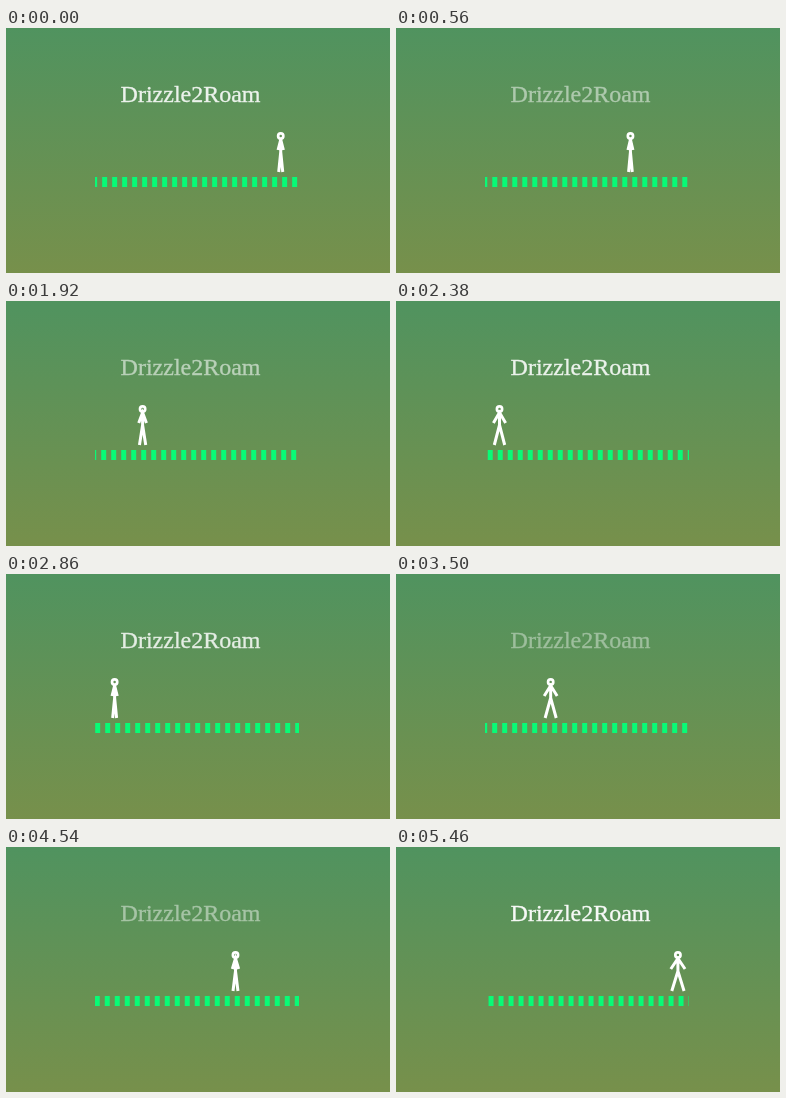
Write an HTML page that moves like this. It is 384 by 245 pixels and loops after 5560 ms.

```html
<!DOCTYPE html>
<html lang="en">
<head>
<meta charset="utf-8">
<title>Drizzle2Roam</title>
<style>
  html, body { margin: 0; width: 100%; height: 100%; overflow: hidden; }
  body { background: linear-gradient(#50935f, #77904b); }
  svg { display: block; width: 384px; height: 245px; }
  text { font: 24px "Liberation Serif", "Times New Roman", serif; fill: #fff; stroke: #fff; stroke-width: 0.35; }
  #walker { fill: none; stroke: #fff; stroke-width: 3; }
  #road { stroke: #08fb76; stroke-width: 10; stroke-dasharray: 5; }
</style>
</head>
<body>
<svg viewBox="0 0 384 245">
  <text id="title" x="114.6" y="74">Drizzle2Roam</text>
  <line id="road" x1="89" y1="154" x2="293" y2="154"/>
  <g id="walker">
    <circle cy="108" r="2.6" stroke-width="2.7"/>
    <path id="limbs"/>
  </g>
</svg>
<script>
  const LOOP = 5560;
  const STEPS = 200;
  const LEFT = 89;
  const SPAN = 200;
  const LEFT_TURN = 93;
  const STRIDE = 10;
  const [title, road, walker, limbs] =
    ["title", "road", "walker", "limbs"].map(id => document.getElementById(id));

  const mod = (a, b) => ((a % b) + b) % b;

  // Triangle wave: 0 at phase 0, 1 at half a period.
  const triangle = (n, period) => 1 - Math.abs(1 - 2 * mod(n, period) / period);

  function draw(time) {
    const n = mod(time, LOOP) / LOOP * STEPS;
    const x = LEFT + SPAN * triangle(n - LEFT_TURN, STEPS) - 0.2;
    const swing = triangle(n - 1.5, STRIDE);
    const leg = 0.3 + 5.9 * swing;
    const arm = 0.8 + 6.4 * swing;

    walker.setAttribute("transform", `translate(${x} 0)`);
    limbs.setAttribute("d",
      `M0 110.5V125M${-arm} 122L0 111.5L${arm} 122M${-leg} 144L0 124L${leg} 144`);

    // The road slides against the walker at half its speed.
    const dashStart = 143.5 - x / 2;
    road.setAttribute("stroke-dashoffset", mod(LEFT - dashStart, 10));

    const fromCentre = Math.abs(x - LEFT - SPAN / 2) / (SPAN / 2);
    title.setAttribute("opacity", Math.min(1, 0.08 + 0.94 * fromCentre));
  }

  const start = performance.now();
  function tick(now) {
    draw(Math.max(0, now - start));
    requestAnimationFrame(tick);
  }
  draw(0);
  requestAnimationFrame(tick);
</script>
</body>
</html>
```
